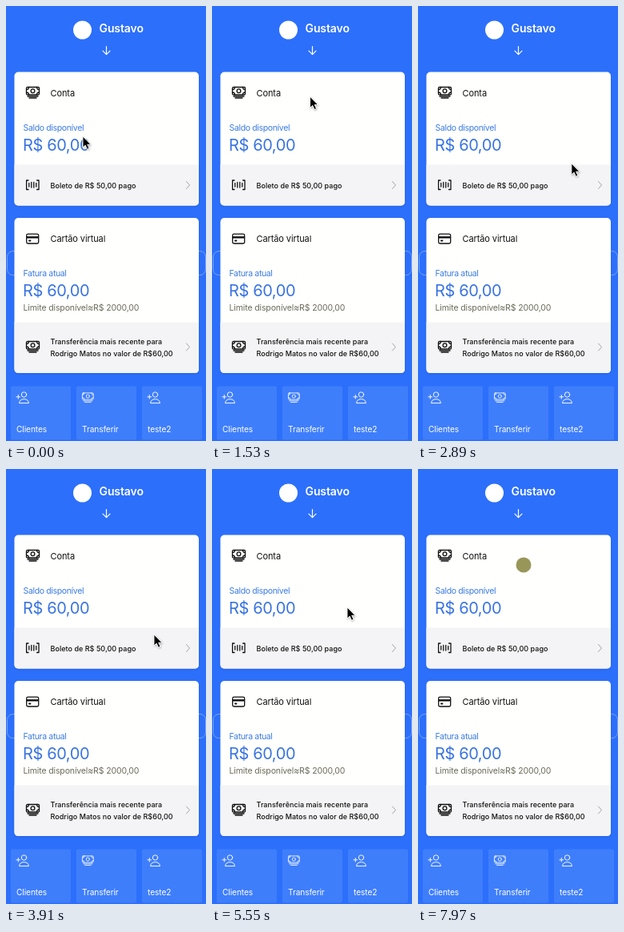
An HTML page that plays this animation: 250 by 544 pixels, repeating every 8000 ms.

```html
<!DOCTYPE html>
<html lang="pt-BR">
<head>
<meta charset="utf-8">
<title>Conta</title>
<style>
html, body { margin: 0; width: 100%; height: 100%; overflow: hidden; background: #2c6ffb; }
svg { display: block; width: 100%; height: 100%; }
text { font-family: Inter, "Liberation Sans", sans-serif; font-size: 10.5px; letter-spacing: -.2px; }
.name { font-size: 14px; font-weight: 600; fill: #fff; letter-spacing: -.1px; }
.title { font-size: 11px; fill: #111; letter-spacing: -.1px; }
.label { fill: #3a7be6; letter-spacing: -.35px; }
.sum { font-size: 20px; fill: #3873e2; letter-spacing: -.4px; }
.limit { fill: #6a6a5a; letter-spacing: -.13px; }
.note { font-size: 9px; font-weight: 500; fill: #111; letter-spacing: .03px; }
.tile { fill: #fff; letter-spacing: -.1px; font-size: 10.2px; }
.line { fill: none; stroke-linecap: round; stroke-linejoin: round; }
.dark { stroke: #111; stroke-width: 1.3; }
.light { stroke: #f4f8ff; stroke-width: 1; }
.more { stroke: #a3a3a0; }
</style>
</head>
<body>
<svg viewBox="0 0 250 544">
  <defs>
    <filter id="shade" x="-10%" y="-10%" width="120%" height="125%">
      <feDropShadow dx="0" dy="1" stdDeviation="1" flood-color="#123a9a" flood-opacity=".25"/>
    </filter>
    <filter id="soft" x="-40%" y="-30%" width="190%" height="180%">
      <feDropShadow dx=".5" dy="1" stdDeviation=".8" flood-opacity=".35"/>
    </filter>
    <g id="cash">
      <rect x=".5" y=".5" width="16" height="9.5" rx="1.3"/>
      <circle cx="8.5" cy="5.25" r="2.4"/>
      <path d="M.5 3.5Q3.5 3.5 3.5.5M13.5.5Q13.5 3.5 16.5 3.5M.5 7Q3.5 7 3.5 10M13.5 10Q13.5 7 16.5 7M2 12H15M4 14H13"/>
    </g>
    <g id="person">
      <circle cx="9.5" cy="4" r="3.2"/>
      <path d="M3.6 14.2Q4.2 9.6 9.5 9.6T15.4 14.2ZM2.3 4.5V9.1M0 6.8H4.6"/>
    </g>
    <path id="chevron" d="M0 0L4 4.5L0 9"/>
  </defs>

  <rect width="250" height="544" fill="#2c6ffb"/>
  <rect class="line" x="1.5" y="306.5" width="248" height="30" rx="7" stroke="#78a4f8"/>

  <circle cx="95.5" cy="30" r="11.5" fill="#fff"/>
  <text class="name" x="116.5" y="33">Gustavo</text>
  <path class="line" d="M125.5 50.5V60.5M121 56.2L125.5 60.7L130 56.2" stroke="#fff" stroke-width="1.2"/>

  <g filter="url(#shade)">
    <rect x="10.5" y="82.5" width="230.5" height="167" rx="5" fill="#fffffd"/>
    <path d="M10.5 198.5H241V244.5Q241 249.5 236 249.5H15.5Q10.5 249.5 10.5 244.5Z" fill="#f4f4f6"/>
  </g>
  <use href="#cash" class="line dark" x="25" y="101"/>
  <text class="title" x="55.5" y="113">Conta</text>
  <text class="label" x="21.5" y="156">Saldo disponível</text>
  <text class="sum" x="21" y="181">R$ 60,00</text>
  <path class="line dark" stroke-width="1.5" d="M28 218H25.6V229.5H28M38.6 218H41V229.5H38.6M28.8 221.5V226M31.8 220.5V227M34.8 220.5V227M37.8 221.5V226"/>
  <text class="note" x="55.5" y="228">Boleto de R$ 50,00 pago</text>
  <use href="#chevron" class="line more" x="225.5" y="219.5"/>

  <g filter="url(#shade)">
    <rect x="10.5" y="265" width="230.5" height="194" rx="5" fill="#fffffd"/>
    <path d="M10.5 395.5H241V454Q241 459 236 459H15.5Q10.5 459 10.5 454Z" fill="#f4f4f6"/>
  </g>
  <g class="line dark">
    <rect x="25.7" y="285.2" width="15" height="11.8" rx="1.8"/>
    <path d="M26 289.3H40.5" style="stroke-width: 2.4; stroke-linecap: butt"/>
    <path d="M29 293.5H30.5" style="stroke-width: 1.8"/>
  </g>
  <text class="title" x="55.5" y="295">Cartão virtual</text>
  <text class="label" x="21.5" y="338">Fatura atual</text>
  <text class="sum" x="21" y="363">R$ 60,00</text>
  <text class="limit" x="21.5" y="381">Limite disponível≈R$ 2000,00</text>
  <use href="#cash" class="line dark" x="25" y="419"/>
  <text class="note" x="55.5" y="423">Transferência mais recente para</text>
  <text class="note" x="55.5" y="438">Rodrigo Matos no valor de R$60,00</text>
  <use href="#chevron" class="line more" x="225.5" y="422"/>

  <g fill="#3f7efb">
    <rect x="6" y="475.5" width="75" height="67" rx="2"/>
    <rect x="88" y="475.5" width="75" height="67" rx="2"/>
    <rect x="170" y="475.5" width="75" height="67" rx="2"/>
  </g>
  <g class="line light">
    <use href="#person" x="13" y="482"/>
    <use href="#cash" transform="translate(95 483.5) scale(.86)"/>
    <use href="#person" x="177" y="482"/>
  </g>
  <text class="tile" x="13" y="533">Clientes</text>
  <text class="tile" x="95" y="533">Transferir</text>
  <text class="tile" x="177" y="533">teste2</text>

  <path id="arrow" d="M0 1V15L3.2 12.1L5.5 17.2L8 16.1L5.7 11.2H10Z" fill="#000" stroke="#fff" stroke-width=".9" stroke-linejoin="round" filter="url(#soft)"/>
  <circle id="touch" r="9.5" fill="#99965a"/>
</svg>
<script>
const LOOP = 8000, PRESS = 7800;
const arrow = document.getElementById("arrow");
const touch = document.getElementById("touch");

// Pointer stops: time, x, y
const path = [
  [0, 96, 162], [280, 108, 140], [460, 108, 140], [930, 114, 121],
  [1350, 114, 121], [2090, 171, 63], [2190, 171, 63], [2480, 186, 10],
  [2930, 192, 200], [3770, 192, 206], [3910, 185, 206], [4450, 169, 172],
  [5550, 169, 172], [6200, 154, 161], [7230, 154, 161], [PRESS, 132, 120],
  [LOOP, 132, 120]
];

const ease = u => u * u * (3 - 2 * u);

function pointAt(t) {
  const i = path.findIndex(stop => stop[0] > t);
  const [t0, x0, y0] = path[i - 1], [t1, x1, y1] = path[i];
  const u = ease((t - t0) / (t1 - t0));
  return [x0 + (x1 - x0) * u, y0 + (y1 - y0) * u];
}

function draw(now) {
  const t = now % LOOP, pressed = t >= PRESS;
  const move = `translate(${pointAt(t).join(" ")})`;
  arrow.setAttribute("transform", move);
  touch.setAttribute("transform", move);
  arrow.setAttribute("visibility", pressed ? "hidden" : "visible");
  touch.setAttribute("visibility", pressed ? "visible" : "hidden");
}

const start = performance.now();
function tick() {
  draw(performance.now() - start);
  requestAnimationFrame(tick);
}
tick();
</script>
</body>
</html>
```
